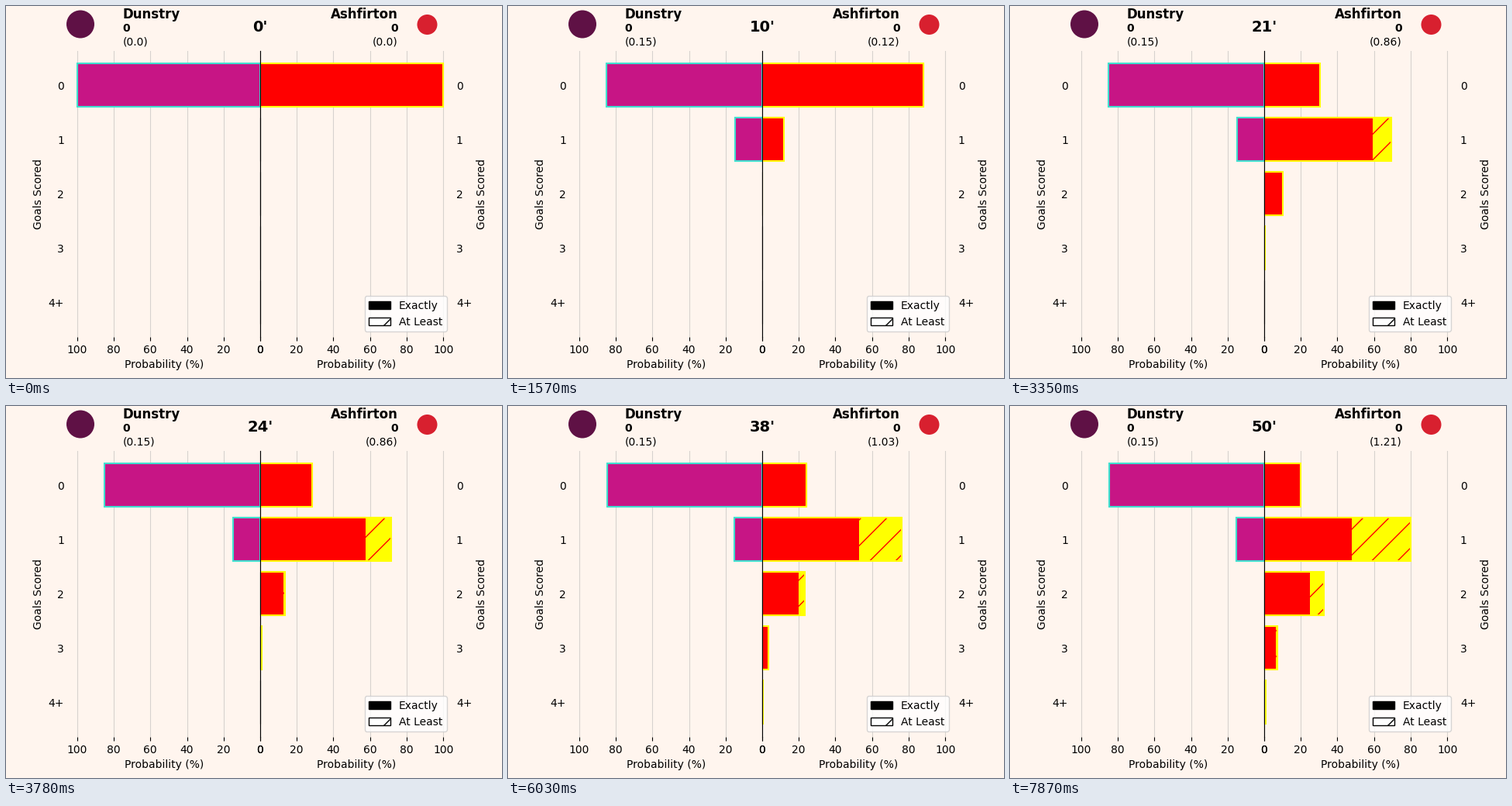
A matplotlib script that plays this animation: 640 px wide and 480 px high, repeating every 8000 ms.

```python
import numpy as np
import matplotlib.pyplot as plt
from matplotlib.animation import FuncAnimation
from matplotlib.patches import Ellipse, Patch

plt.rcParams["font.family"] = "DejaVu Sans"

W, H, DPI = 640, 480, 100
FRAMES, INTERVAL = 250, 32
MINUTE = 157.25          # ms of screen time per match minute
STEPS = 5                # bar positions within one minute
ROWS = np.arange(5)
BG = "seashell"

# (minute, chance of scoring) for every shot
HOME = [(3, .148), (34, .005)]
AWAY = [(6, .02), (9, .10), (13, .64), (21, .10), (26, .06), (32, .05),
        (37, .06), (39, .07), (41, .05), (45, .05), (48, .01)]


def goal_odds(shots, minute):
    """Chances of 0, 1, 2, 3 and 4+ goals, in percent."""
    odds = np.array([100.0, 0, 0, 0, 0])
    for when, p in shots:
        if when <= minute:
            scored = np.append(0, odds[:-1]) * p
            scored[-1] += odds[-1] * p
            odds = odds * (1 - p) + scored
    return odds


def expected(shots, minute):
    total = sum((p for when, p in shots if when <= minute), 0.0)
    return f"({round(total, 2)})"


fig = plt.figure(figsize=(W / DPI, H / DPI), dpi=DPI, facecolor=BG)
axes = fig.subplots(1, 2, gridspec_kw={"wspace": 0})


def label(x, y, s, size=10, weight="bold", ha="left"):
    return fig.text(x / W, 1 - y / H, s, size=size, weight=weight, ha=ha,
                    va="baseline")


def badge(x, y, r, color):
    fig.add_artist(Ellipse((x / W, 1 - y / H), 2 * r / W, 2 * r / H,
                           color=color, lw=0))


class Side:
    def __init__(self, ax, shots, main, accent, name, x, ha):
        self.shots, self.accent = shots, accent
        zero = np.zeros(5)
        self.least = ax.barh(ROWS, zero, fc=accent, ec=main, hatch="/", lw=0)
        self.exact = ax.barh(ROWS, zero, fc=main, lw=0)
        self.frame = ax.barh(ROWS, zero, fc="none", ec=accent, lw=1.5)
        label(x, 15.5, name, 12, ha=ha)
        label(x, 33, "0", ha=ha)
        self.xg = label(x, 50, "", weight="normal", ha=ha)

    def update(self, minute, part):
        old = goal_odds(self.shots, minute - 1)
        exact = old + (goal_odds(self.shots, minute) - old) * part
        least = exact[::-1].cumsum()[::-1]
        least[0] = exact[0]
        for i in ROWS:
            self.exact[i].set_width(exact[i])
            self.least[i].set_width(least[i])
            self.frame[i].set_width(least[i])
            empty = least[i] < .1
            self.frame[i].set_edgecolor("black" if empty else self.accent)
            self.frame[i].set_linewidth(.8 if empty else 1.5)
        self.xg.set_text(expected(self.shots, minute))


def style(ax, xlim, side, inner):
    ax.set_facecolor(BG)
    ax.set_xlim(*xlim)
    ax.set_ylim(4.64, -.64)
    ax.set_xticks(range(0, 101, 20))
    ax.set_yticks(ROWS, ["0", "1", "2", "3", "4+"])
    ax.yaxis.set_ticks_position(side)
    ax.yaxis.set_label_position(side)
    ax.tick_params(axis="y", length=0)
    ax.set_xlabel("Probability (%)")
    ax.set_ylabel("Goals Scored")
    ax.grid(axis="x", alpha=.5)
    ax.set_axisbelow(True)
    for key, spine in ax.spines.items():
        spine.set_visible(key == inner)


sides = [
    Side(axes[0], HOME, "mediumvioletred", "turquoise", "Dunstry",
         150.4, "left"),
    Side(axes[1], AWAY, "red", "yellow", "Ashfirton", 505.6, "right"),
]
style(axes[0], (105, 0), "left", "right")
style(axes[1], (0, 105), "right", "left")
axes[1].legend(handles=[
    Patch(fc="black", ec="black", label="Exactly"),
    Patch(fc="white", ec="black", hatch="/", label="At Least"),
], loc="lower right")

badge(96, 23.5, 18, "#5f1145")
badge(543.5, 24, 13, "#d8202f")
clock = label(328, 33, "", 14, ha="center")


def draw(i):
    minute, rest = divmod(i * INTERVAL + 24, MINUTE)
    part = (int(rest / MINUTE * STEPS) + 1) / STEPS
    clock.set_text(f"{int(minute)}'")
    for side in sides:
        side.update(minute, part)
    return []


anim = FuncAnimation(fig, draw, frames=FRAMES, interval=INTERVAL,
                     init_func=lambda: draw(0), repeat=True, repeat_delay=0)
plt.show()
```
